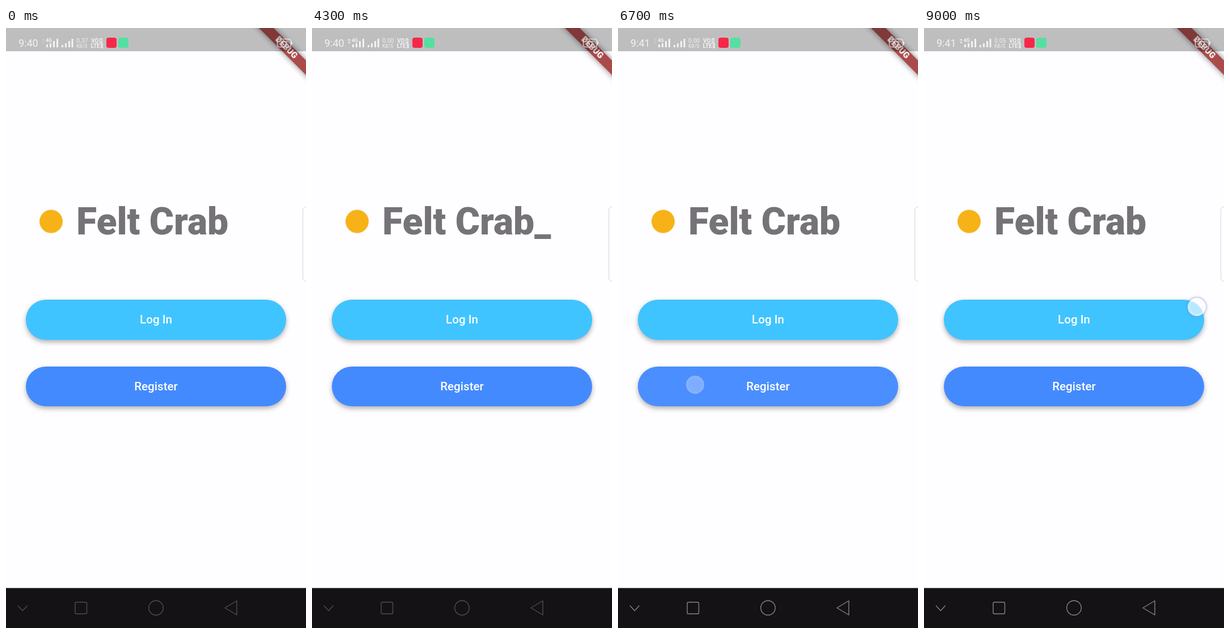
An HTML page for the animation above (9100 ms loop, 529 by 1058 pixels).

```html
<!DOCTYPE html>
<html lang="en">
<head>
<meta charset="utf-8">
<title>Chat app welcome flow</title>
<style>
  html, body { margin: 0; width: 100%; height: 100%; overflow: hidden; background: #fefdff; }
  #stage { position: relative; width: 529px; height: 1058px; overflow: hidden; background: #fefdff; font-family: Roboto, sans-serif; }
  #stage * { box-sizing: border-box; }
  .app, .page { position: absolute; left: 0; top: 0; width: 529px; height: 987.5px; overflow: hidden; background: #fefdff; }
  .system { position: absolute; left: 0; top: 0; }

  .title { position: absolute; left: 124px; top: 301.5px; margin: 0; font-size: 66px; line-height: 80px; font-weight: 900; color: #757377; white-space: pre; }
  .button, .field { position: absolute; left: 35.27px; width: 458.46px; height: 70.53px; border-radius: 35.27px; }
  .button { font-size: 20.57px; line-height: 70.5px; font-weight: 500; text-align: center; color: #fff; box-shadow: 0 4px 8px rgba(0, 0, 0, .3); }
  .field { padding-left: 28px; border: 1.6px solid; font-size: 23.5px; line-height: 67.5px; }
  .field span { color: #dddbe1; }
  .login .button, .button.login { background: #40c4ff; }
  .register .button, .button.register { background: #448aff; }
  .login .field { border-color: #40b8e6; }
  .register .field { border-color: #4384e6; }
  .app > .login.button { top: 479px; }
  .app > .register.button { top: 596.6px; }
  .page .button { top: 734.7px; }
  .email { top: 523.1px; }
  .password { top: 605.4px; }

  .emblem { position: absolute; left: 198px; top: 239px; width: 133px; height: 133px; border-radius: 50%; background: #f6b217; }
  .edge { position: absolute; left: 523px; top: 315px; width: 20px; height: 132px; border: 1.5px solid #d6d4d8; border-radius: 6px; background: #fefdff; }
  .ribbon { position: absolute; left: 423.75px; top: 26.4px; width: 140px; height: 17.7px; transform: rotate(45deg); background: #ab4a4a; box-shadow: 0 0 11px rgba(0, 0, 0, .5); color: #fff; font-size: 15px; line-height: 17.7px; font-weight: 900; text-align: center; }

  .touch { position: absolute; width: 32px; height: 32px; margin: -16px; border-radius: 50%; opacity: 0;
    background: radial-gradient(rgba(255, 255, 255, .62) 45%, rgba(255, 255, 255, .85) 88%);
    box-shadow: 0 0 4px 1px rgba(100, 140, 210, .65); }

  /* Every track is paused here and moved along by the script's clock. */
  .page, .emblem, .touch, .press, .tint, .icons { animation: 9.1s linear infinite paused; }
  .page.login { animation-name: login-fade, login-slide; }
  .page.register { animation-name: register-fade, register-slide; }
  .emblem { animation-name: emblem; }
  .press, .touch.back { animation-name: press; }
  .touch.sign-up { animation-name: tap-register; }
  .touch.sign-in { animation-name: tap-login; }
  .tint { animation-name: tint; }
  .icons { animation-name: icons; }

  @keyframes login-fade {
    0%, 48.33% { opacity: 0; }
    48.34%, 60.44% { opacity: 1; animation-timing-function: ease-out; }
    63.736%, 100% { opacity: 0; }
  }
  @keyframes login-slide {
    0%, 60.44% { transform: none; animation-timing-function: cubic-bezier(.8, 0, .6, 1); }
    63.736%, 100% { transform: translateY(247px); }
  }
  @keyframes register-fade {
    0%, 73.626% { opacity: 0; animation-timing-function: ease-in; }
    76.9%, 93.407% { opacity: 1; animation-timing-function: ease-out; }
    96.703%, 100% { opacity: 0; }
  }
  @keyframes register-slide {
    0%, 73.626% { transform: translateY(247px); animation-timing-function: cubic-bezier(.4, 0, .2, 1); }
    76.9%, 93.407% { transform: none; animation-timing-function: cubic-bezier(.8, 0, .6, 1); }
    96.703%, 100% { transform: translateY(247px); }
  }
  @keyframes emblem {
    0%, 48.33% { transform: translate(-185px, 35.5px) scale(.308); }
    48.34%, 60.44% { transform: none; animation-timing-function: cubic-bezier(.8, 0, .6, 1); }
    63.736%, 73.626% { transform: translate(-185px, 35.5px) scale(.308); animation-timing-function: cubic-bezier(.4, 0, .2, 1); }
    76.9%, 93.407% { transform: none; animation-timing-function: cubic-bezier(.8, 0, .6, 1); }
    96.703%, 100% { transform: translate(-185px, 35.5px) scale(.308); }
  }
  @keyframes press {
    0%, 59.32% { opacity: 0; }
    59.33%, 60.44% { opacity: 1; }
    64%, 92.29% { opacity: 0; }
    92.3%, 93.407% { opacity: 1; }
    96.9%, 100% { opacity: 0; }
  }
  @keyframes tap-register {
    0%, 71.41% { opacity: 0; }
    71.42%, 72.6% { opacity: .9; }
    73.626% { opacity: .45; }
    74.725%, 100% { opacity: 0; }
  }
  @keyframes tap-login {
    0%, 97.79% { opacity: 0; }
    97.8%, 100% { opacity: 1; }
  }
  @keyframes tint {
    0%, 71.42% { background: #448aff; }
    73%, 74.7% { background: #4b8eff; }
    76.9%, 100% { background: #448aff; }
  }
  @keyframes icons {
    0%, 60.44% { stroke: #504d52; }
    61.5%, 83.5% { stroke: #858287; }
    89%, 93.407% { stroke: #504d52; }
    94.5%, 100% { stroke: #858287; }
  }
</style>
</head>
<body>
<div id="stage">
  <div class="app">
    <h1 class="title"><span id="typed">Felt Crab</span><span id="cursor">_</span></h1>
    <div class="button login">Log In</div>
    <div class="button register tint">Register</div>

    <div class="page login">
      <div class="field email"><span>Enter your email</span></div>
      <div class="field password"><span>Enter the password</span></div>
      <div class="button">Log In</div>
    </div>
    <div class="page register">
      <div class="field email"><span>Enter your Email</span></div>
      <div class="field password"><span>Enter the password</span></div>
      <div class="button">Register</div>
    </div>
    <div class="emblem"></div>
    <div class="ribbon">DEBUG</div>
  </div>

  <div class="system" style="width:529px;height:41px;background:rgba(0,0,0,.25)"></div>
  <div class="edge"></div>

  <svg class="system" width="529" height="1058" font-family="Roboto, sans-serif">
    <g fill="#f3f1f3">
      <text id="clock" x="22" y="33" font-size="18">9:40</text>
      <g id="arrows"><path d="M63 22l2.5-3 2.5 3z"/><path d="M63 24.5h5l-2.5 3z"/></g>
      <text x="70" y="25" font-size="8.5" font-weight="700">4G</text>
      <path d="M71 29h3v5h-3zM77 27h3v7h-3zM83 23h3v11h-3zM89 19h3v15h-3z"/>
      <path d="M98 30h3v4h-3zM104 27h3v7h-3zM110 23h3v11h-3zM115.5 19h3v15h-3z"/>
      <text id="speed" x="124" y="26" font-size="10.5">0.37</text>
      <text x="124" y="34.5" font-size="8.5">KB/S</text>
      <g font-size="10" font-weight="700"><text x="150" y="26">VO</text><text x="149.5" y="35">LTE</text></g>
      <path d="M166 19h3v7h-3zM168 28h2v7h-2z" fill="none" stroke="#f3f1f3" stroke-width="1.4"/>
    </g>
    <rect x="177" y="17" width="18" height="18" rx="4" fill="#f52848"/>
    <rect x="198" y="17" width="18" height="18" rx="4" fill="#55dfa0"/>
    <g opacity=".7">
      <rect x="478.5" y="19.5" width="24" height="14" rx="4" fill="none" stroke="#fff" stroke-width="1.6"/>
      <path d="M504 24v5" stroke="#fff" stroke-width="2"/>
      <text x="490.5" y="30.5" font-size="11" font-weight="500" fill="#fff" text-anchor="middle">82</text>
    </g>

    <rect y="987.5" width="529" height="70.5" fill="#151216"/>
    <rect class="press" x="325" y="987.5" width="143.5" height="70.5" rx="35" fill="#3a373b"/>
    <g class="icons" fill="none" stroke="#504d52" stroke-width="1.4" stroke-linejoin="round">
      <path d="M21 1018.5l8.3 9 8.3-9"/>
      <rect x="122" y="1012.5" width="20.5" height="20.5" rx="2"/>
      <circle cx="264.5" cy="1022.5" r="12.8"/>
      <path d="M386 1022.5L407 1010V1035z"/>
    </g>
  </svg>

  <div class="touch back" style="left:420px;top:1026.5px"></div>
  <div class="touch sign-up" style="left:136px;top:629px"></div>
  <div class="touch sign-in" style="left:481px;top:492px"></div>
</div>

<script>
  const LOOP = 9100;
  const NAME = "Felt Crab";
  const CLEAR = 1790, KEY = 150;
  const BLINKS = [100, 300, 500, 600, 1940, 3450, 3600, 3750, 3900, 4050, 4290, 4400];
  const ARROWS = [3400, 4900, 7600];
  const tracks = document.getAnimations();
  const byId = id => document.getElementById(id);
  const toggled = (times, t) => times.filter(x => x <= t).length % 2 === 1;
  const setText = (id, text) => { if (byId(id).textContent !== text) byId(id).textContent = text; };

  function render(t) {
    tracks.forEach(track => { track.currentTime = t; });
    const typing = t >= CLEAR && t < 4400;
    setText("typed", typing ? NAME.slice(0, Math.floor((t - CLEAR) / KEY)) : NAME);
    byId("cursor").style.visibility = toggled(BLINKS, t) ? "visible" : "hidden";
    setText("clock", t < 5200 ? "9:40" : "9:41");
    setText("speed", t < 2900 ? "0.37" : t < 7600 ? "0.00" : "0.05");
    byId("arrows").setAttribute("opacity", toggled(ARROWS, t) ? 1 : .3);
  }

  let start;
  function tick(now) {
    start ??= now;
    render((now - start) % LOOP);
    requestAnimationFrame(tick);
  }
  render(0);
  requestAnimationFrame(tick);
</script>
</body>
</html>
```
